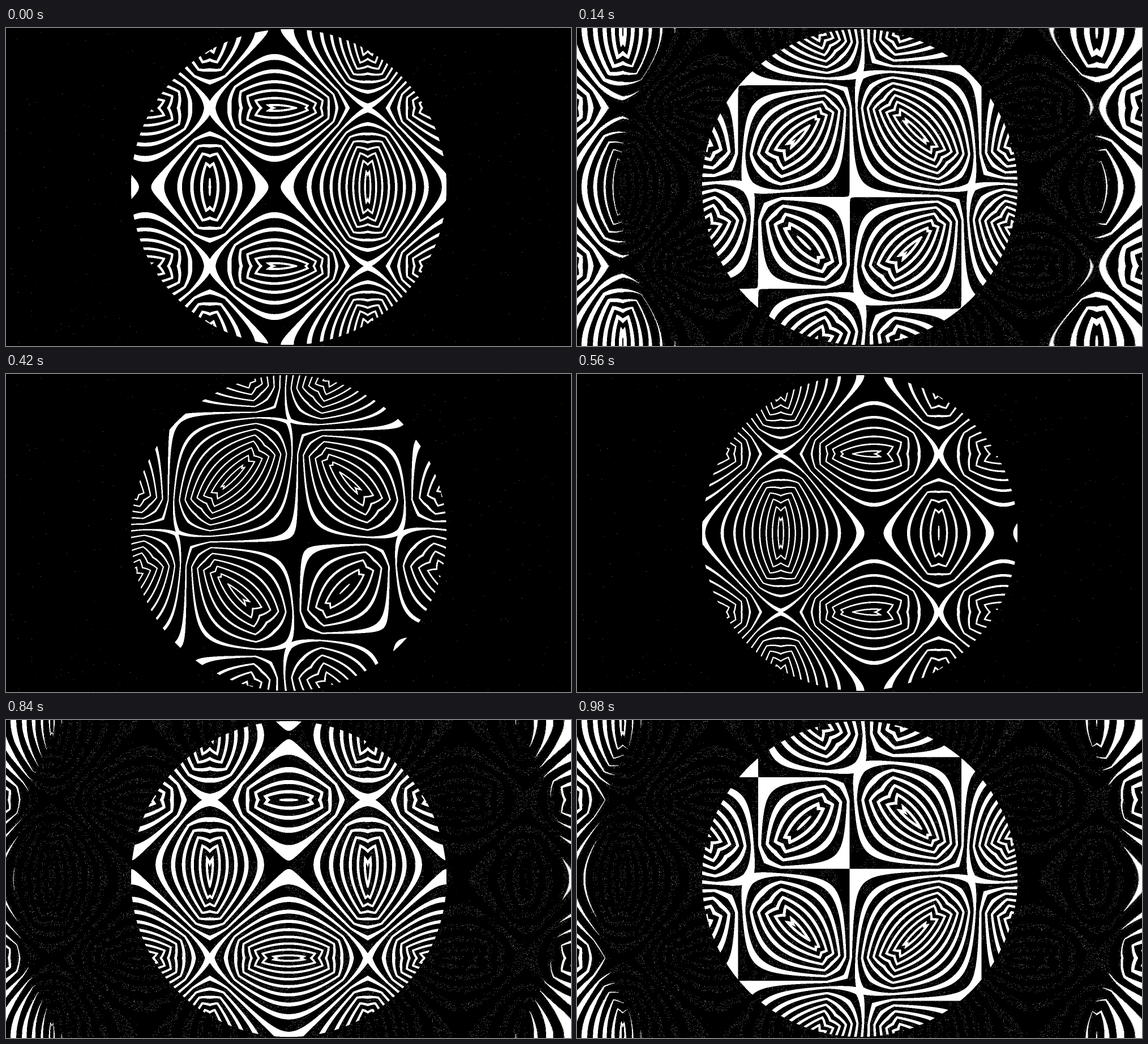
Write an HTML page with a canvas that moves like this. It is 998 by 561 pixels and loops after 1.12 s.

```html
<!DOCTYPE html>
<html lang="en">
<head>
<meta charset="utf-8">
<title>Turning contours</title>
<style>
  html, body { margin: 0; width: 100%; height: 100%; overflow: hidden; background: #000; }
  canvas { display: block; width: 998px; height: 561px; }
</style>
</head>
<body>
<canvas id="stage" width="998" height="561"></canvas>
<script>
const W = 998, H = 561, CX = 499.5, CY = 280.5;
const UNIT = 279, RADIUS = 278.7, HOLD = 140;
const TILT = 0.18;

// line: share of each contour period that is white
// rim: radius where the outer contours begin (0 = only sparse dots outside)
const STEPS = [
  { line: 0.33, rim: 0 },
  { line: 0.41, rim: 425 },
  { line: 0.385, rim: 488 },
  { line: 0.22, rim: 0 },
  { line: 0.22, rim: 0 },
  { line: 0.27, rim: 0 },
  { line: 0.37, rim: 485 },
  { line: 0.405, rim: 470 }
];

const ctx = document.getElementById('stage').getContext('2d');
const cache = [];

// Mirror-repeat into -0.5 .. 0.5
function mirror(v) {
  const n = Math.round(v);
  return n & 1 ? n - v : v - n;
}

// Tilted saddle, tiled by mirrors, its radius folded back at one half
function field(x, y) {
  x = mirror(x);
  y = mirror(y);
  const r = Math.sqrt(x * x + y * y);
  if (r > 0.5) {
    const k = (1 - r) / r;
    x *= k;
    y *= k;
  }
  return x * x - y * y + TILT * x;
}

// Distance to the middle of the nearest band, 0 .. 1
const offBand = v => 2 * Math.abs(v - Math.round(v));

function hash(x, y) {
  let h = Math.imul(x + 71, 374761393) ^ Math.imul(y + 13, 668265263);
  h = Math.imul(h ^ (h >>> 15), 2246822519);
  h = Math.imul(h ^ (h >>> 13), 3266489917);
  return ((h ^ (h >>> 16)) >>> 0) / 4294967296;
}

const SUB = [-0.25, 0.25];

function discLight(px, py, cos, sin, line) {
  let hits = 0;
  for (const oy of SUB) {
    for (const ox of SUB) {
      const dx = px + ox, dy = py + oy;
      if (dx * dx + dy * dy > RADIUS * RADIUS) continue;
      const x = dx / UNIT, y = dy / UNIT;
      if (offBand(25 * field(x * cos - y * sin, x * sin + y * cos)) < line) hits++;
    }
  }
  return hits * 63.75;
}

function rimLight(off, r, rim) {
  const width = Math.min(0.45, (r - rim) / 120);
  if (width <= 0) return 0;
  if (off < width) return 255;
  return off < width + 0.06 ? 128 : 0;
}

function dotLight(x, y, off, busy) {
  const h = hash(x, y);
  const limit = busy && off < 0.5 ? 0.08 : 0.0007;
  return h < limit ? 45 + 85 * hash(y + 900, x) : 0;
}

function render(i) {
  const { line, rim } = STEPS[i];
  const cos = Math.cos(i * Math.PI / 4), sin = Math.sin(i * Math.PI / 4);
  const img = ctx.createImageData(W, H);
  const px = new Uint32Array(img.data.buffer);
  for (let y = 0; y < H; y++) {
    for (let x = 0; x < W; x++) {
      const dx = x + 0.5 - CX, dy = y + 0.5 - CY;
      const r = Math.sqrt(dx * dx + dy * dy);
      const off = rim ? offBand(19 * (field(dx / UNIT, dy / UNIT) - 0.007)) : 1;
      let light = 0;
      if (r < RADIUS + 1) light = discLight(dx, dy, cos, sin, line);
      else if (rim) light = rimLight(off, r, rim);
      light = Math.max(light, dotLight(x, y, off, rim > 0));
      px[y * W + x] = 0xff000000 | (light | 0) * 0x010101;
    }
  }
  return img;
}

let shown = -1;
function draw() {
  const i = Math.floor(performance.now() / HOLD) % STEPS.length;
  if (i !== shown) {
    cache[i] = cache[i] || render(i);
    ctx.putImageData(cache[i], 0, 0);
    shown = i;
  }
  requestAnimationFrame(draw);
}
draw();
</script>
</body>
</html>
```
